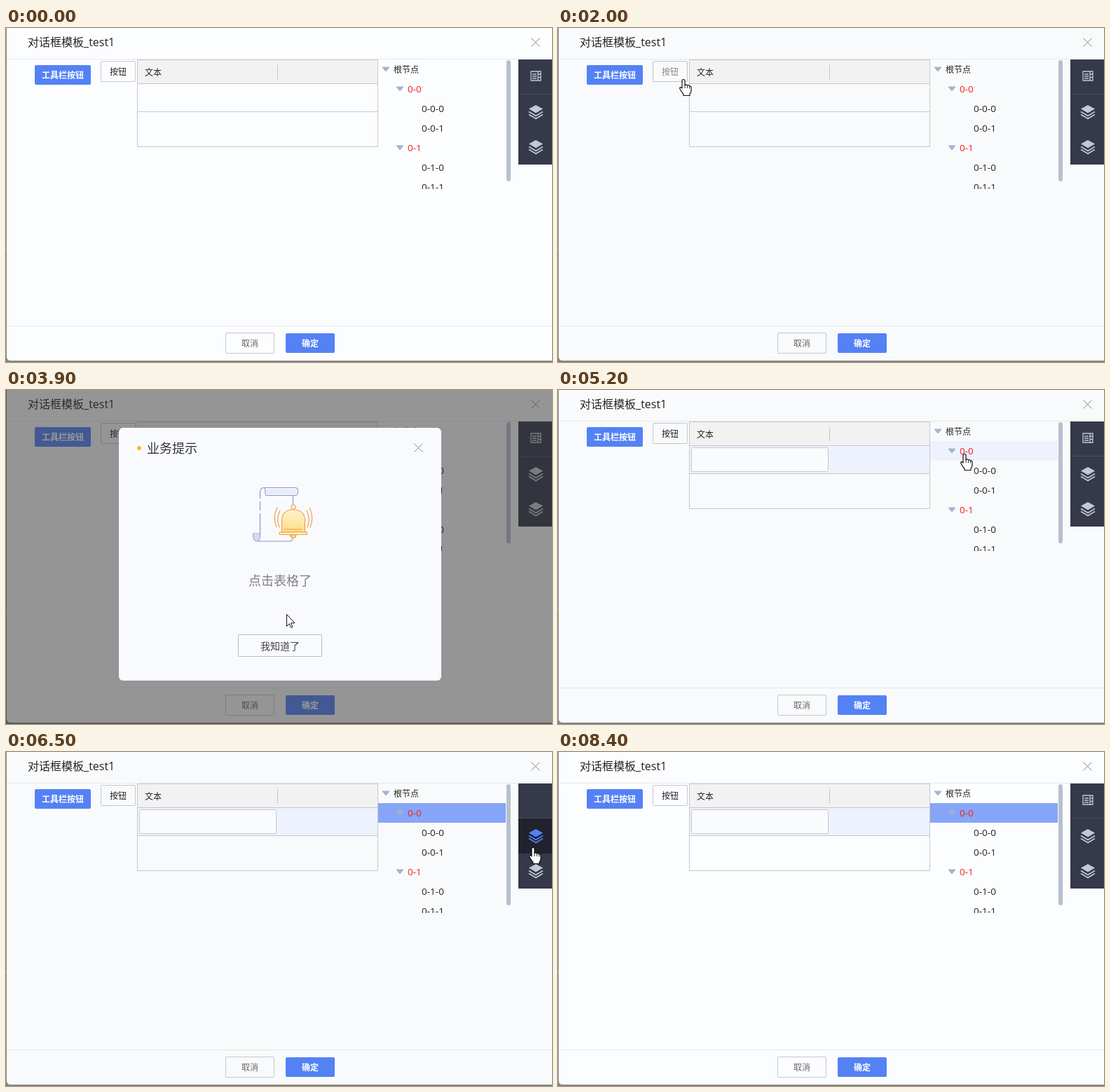
Write an HTML page that moves like this. It is 779 by 477 pixels and loops after 8.9 s.

```html
<!DOCTYPE html>
<html lang="zh-CN">
<head>
<meta charset="utf-8">
<title>对话框模板</title>
<style>
html, body { margin: 0; width: 100%; height: 100%; overflow: hidden; background: #858585; }
svg { display: block; width: 779px; height: 477px; }
text { font: 12px "Open Sans", "Noto Sans CJK SC", "Noto Sans CJK", sans-serif; fill: #222; }
.mid { text-anchor: middle; }
.strong { font-weight: 600; fill: #fff; }
.num { font-size: 13.5px; }
.red { fill: #f5201f; }
.line { fill: none; stroke: #c6c7c9; }
.btn { fill: none; stroke: #c5c8d0; }
.blue { fill: #5482f5; }
.cross { fill: none; stroke: #888; }
.tri { fill: #a5b3cd; }
.paper { fill: none; stroke: #8d99cb; stroke-width: 1.2; }
.bell { stroke: #f3a04b; stroke-width: 1.2; stroke-linecap: round; }
.hover text { fill: #888; }
.hover rect { stroke: #bfc1c6; }
.item { color: #c3c8d5; }
.item .back { fill: none; }
.item.on { color: #5482f5; }
.item.on .back { fill: #20222d; }
</style>
</head>
<body>
<svg viewBox="0 0 779 477" xmlns="http://www.w3.org/2000/svg">
  <defs>
    <clipPath id="treeClip"><rect x="531" y="45" width="190" height="185"/></clipPath>
    <linearGradient id="gold" x2="0" y2="1">
      <stop offset="0" stop-color="#fff3cf"/><stop offset="1" stop-color="#fddd85"/>
    </linearGradient>
    <g id="layers">
      <path d="M0-10L10-4.5L0 1.5L-10-4.5Z" fill="currentColor"/>
      <path d="M-10-.5L0 5.5L10-.5M-10 3.5L0 9.5L10 3.5" fill="none" stroke="currentColor" stroke-width="1.6"/>
    </g>
  </defs>

  <rect width="779" height="477" fill="#858585"/>
  <path id="page" d="M1 0H779V475H7Q1 475 1 469Z"/>
  <rect y="313" width="1" height="3" fill="#d9a441"/>
  <path d="M1 44.5H779M1 425.5H779" stroke="#e5e7eb"/>
  <text x="31" y="26" style="font-size:16px">对话框模板_test1</text>
  <path class="cross" d="M749.5 14.5L761.5 26.5M761.5 14.5L749.5 26.5"/>

  <rect class="blue" x="41" y="53" width="80" height="28" rx="2"/>
  <text class="mid strong" x="81" y="72">工具栏按钮</text>
  <g id="plain">
    <rect class="btn" x="135.5" y="47.5" width="49" height="29" rx="1.5"/>
    <text class="mid" x="160" y="67">按钮</text>
  </g>

  <rect x="188" y="46" width="342" height="33" fill="#f2f2f2"/>
  <g id="row">
    <rect x="188" y="80" width="342" height="39" fill="#eef2fe"/>
    <rect x="190.5" y="82.5" width="195" height="34" rx="2" fill="#fafbfd" stroke="#c5c8d0"/>
  </g>
  <path class="line" d="M187.5 45.5H530.5V169.5H187.5ZM187.5 79.5H530.5M187.5 119.5H530.5M387.5 53V73"/>
  <text x="198" y="67.500" fill="#333">文本</text>

  <g clip-path="url(#treeClip)">
    <rect id="node" x="531" y="73" width="182" height="28"/>
    <g id="tree"></g>
  </g>
  <rect x="714" y="46" width="6" height="173" rx="3" fill="#b7c0cf"/>

  <rect x="731" y="45" width="48" height="150" fill="#35394a"/>
  <g class="item">
    <rect class="back" x="731" y="45" width="48" height="50"/>
    <g id="panel" fill="none" stroke="currentColor" stroke-width="1.3">
      <path d="M749 62H759V75H749ZM759 62H763V75H759M751 66H757M751 69H757M751 72H757M759 66H763M759 70.500H763"/>
    </g>
  </g>
  <g class="item">
    <rect class="back" x="731" y="95" width="48" height="50"/>
    <use href="#layers" x="756" y="120"/>
  </g>
  <g class="item">
    <rect class="back" x="731" y="145" width="48" height="50"/>
    <use href="#layers" x="756" y="170"/>
  </g>
  <path d="M731 94.5H779" stroke="#4a4e5e"/>

  <rect class="btn" x="313.5" y="435.5" width="69" height="29" rx="1.5"/>
  <text class="mid" x="348" y="455" style="fill:#666">取消</text>
  <rect class="blue" x="399" y="436" width="70" height="28" rx="2"/>
  <text class="mid strong" x="434" y="455">确定</text>

  <g id="modal">
    <rect width="779" height="477" fill="rgb(51,51,51)" fill-opacity=".5"/>
    <rect x="161" y="54" width="460" height="361" rx="6" fill="#f8fafd"/>
    <circle cx="190" cy="83" r="3" fill="#fcbf22"/>
    <text x="201" y="90" style="font-size:18px;fill:#333">业务提示</text>
    <path class="cross" d="M582.5 76.5L594.5 88.5M594.5 76.5L582.5 88.5"/>
    <path class="paper" d="M362.500 155V145Q363 139.500 368 139.500H413Q416.500 140 416.500 145T413 150.500H371Q370 150.500 370 145T367 139.500M362.500 159V172M362.500 176V205M409.500 150.500V164"/>
    <path class="paper" fill="#dfe4f5" d="M372 141.500H413Q415 145 413 149H372Z" style="fill:#e8ecf8;stroke:none"/>
    <path class="paper" d="M352.500 205H362.500Q363 215.500 358 216H405Q409 215 409.500 211M358 216Q352.500 215.500 352.500 205" style="fill:none"/>
    <path d="M353 205.500H362Q362 214 358 215.500Q353 214 353 205.500Z" fill="#d5dcf2"/>
    <g class="bell" fill="none">
      <path d="M393.500 203V186Q394 171 410 171T426.500 186V203Z" fill="url(#gold)"/>
      <rect x="390" y="203" width="40" height="3.500" rx="1.700" fill="#fff0c2"/>
      <path d="M405 207Q406 211 410 211T414 207Z" fill="#fddd85"/>
      <circle cx="410" cy="167" r="3" fill="#f8fafd"/>
      <path d="M397 199H422M391 172Q385 184 390 196M387 168Q380 182 386 196M429 172Q435 184 430 196M433 168Q440 182 434 196"/>
    </g>
    <text id="note" class="mid" x="391" y="279" style="font-size:18px;fill:#808080"></text>
    <rect class="btn" x="331.5" y="349.5" width="119" height="31" rx="1.500" style="stroke:#b9bcc2"/>
    <text class="mid" x="391" y="371" style="font-size:14px;fill:#444">我知道了</text>
  </g>

  <g id="cursor" fill="#fff" stroke="#111" stroke-linejoin="round">
    <path id="arrow" d="M.5.5V17.500L4.300 13.800L6.800 19.500L9 18.500L6.600 12.800H12Z"/>
    <g id="hand" stroke-width="1.200">
      <path d="M-2 13V2.500Q-2 .5 0 .5T2 2.500V8.500Q4 7 5.500 9Q7.500 8 8.500 10Q11 9.500 11 12.500V16Q11 19 9 21V23.500H0V21.500Q-3 18-5 14Q-6 11.500-4 11.500L-2 13Z"/>
      <path d="M2 8V13M5.400 9V13M8.500 10V13.500" fill="none" stroke-width=".9"/>
    </g>
  </g>
</svg>
<script>
const LOOP = 8900, STEP = 100;
const el = id => document.getElementById(id);
const show = (node, on) => { node.style.display = on ? '' : 'none'; };
const within = (t, a, b) => t >= a && t < b;

const labels = ['根节点', '0-0', '0-0-0', '0-0-1', '0-1', '0-1-0', '0-1-1'];
el('tree').innerHTML = labels.map((label, i) => {
  const depth = i ? label.split('-').length - 1 : 0;
  const x = 553 + depth * 20, y = 59 + i * 28;
  const mark = depth < 2
    ? `<path class="tri" d="M${x - 16} ${y - 3}h10l-5 6z" stroke="#a5b3cd" stroke-linejoin="round"/>` : '';
  const kind = i ? (depth === 1 ? 'num red' : 'num') : '';
  return `${mark}<text class="${kind}" x="${x}" y="${y + (i ? 5 : 4.5)}">${label}</text>`;
}).join('');

// opening time, closing time, message
const notices = [
  [700, 1500, '点击工具栏按钮了'],
  [2300, 2800, '点击按钮了'],
  [3700, 4400, '点击表格了'],
  [5500, 6100, '点击树节点了'],
  [6800, 7800, '点击树形菜单了']
];

// time, x, y of the pointer tip
const path = [
  [200, 300, 240], [500, 82, 68], [700, 84, 69], [1200, 388, 360], [1500, 386, 360],
  [1700, 338, 257], [1900, 373, 97], [2000, 179, 73], [2200, 179, 73],
  [2600, 395, 360], [2900, 395, 358], [3000, 395, 290], [3400, 300, 98], [3600, 300, 99],
  [3900, 400, 320], [4000, 409, 356], [4200, 441, 357], [4400, 440, 356],
  [4900, 425, 310], [5100, 425, 310], [5200, 580, 91], [5400, 580, 92],
  [5800, 430, 358], [6100, 428, 358], [6400, 584, 116], [6500, 752, 136], [6700, 752, 136],
  [7000, 690, 190], [7100, 670, 200], [7300, 543, 270], [7600, 378, 362], [7900, 375, 364],
  [8100, 500, 270], [8300, 758, 72], [8400, 800, 50]
];

function pointer(t) {
  const i = path.findIndex(p => p[0] > t);
  if (i < 1) return null;
  const [t0, x0, y0] = path[i - 1], [t1, x1, y1] = path[i];
  const k = (t - t0) / (t1 - t0);
  return { x: Math.round(x0 + (x1 - x0) * k), y: Math.round(y0 + (y1 - y0) * k) };
}

const inside = (p, x0, y0, x1, y1) => p && p.x >= x0 && p.x < x1 && p.y >= y0 && p.y < y1;
const items = [...document.querySelectorAll('.item')];

function draw(t) {
  const p = pointer(t);
  const notice = notices.find(n => within(t, n[0], n[1]));
  const free = notice ? null : p;

  el('page').setAttribute('fill', within(t, 200, 7800) ? '#f9fafb' : '#fcfdff');
  show(el('modal'), notice);
  if (notice) el('note').textContent = notice[2];

  const overPlain = inside(free, 135, 47, 185, 77);
  const overNode = inside(free, 531, 73, 713, 101);
  el('plain').setAttribute('class', overPlain ? 'hover' : '');
  show(el('row'), t >= 3500);
  el('node').setAttribute('fill', t >= 5300 ? '#87a5f7' : overNode ? '#eef2fe' : 'none');

  let overItem = false;
  items.forEach((item, i) => {
    const on = inside(free, 731, 45 + i * 50, 779, 95 + i * 50);
    item.classList.toggle('on', !!on);
    overItem = overItem || on;
  });
  show(el('panel'), !within(t, 6500, 6700));

  show(el('cursor'), p);
  if (!p) return;
  const hand = overPlain || overNode || overItem || within(t, 2800, 3100) ||
    inside(free, 41, 53, 121, 81) || within(t, 7800, 8000) ||
    (notice && inside(p, 331, 349, 451, 381));
  show(el('hand'), hand);
  show(el('arrow'), !hand);
  el('cursor').setAttribute('transform', `translate(${p.x} ${p.y})`);
}

const start = performance.now();
function tick() {
  const t = (performance.now() - start) % LOOP;
  draw(Math.floor(t / STEP) * STEP);
  requestAnimationFrame(tick);
}
draw(0);
requestAnimationFrame(tick);
</script>
</body>
</html>
```
